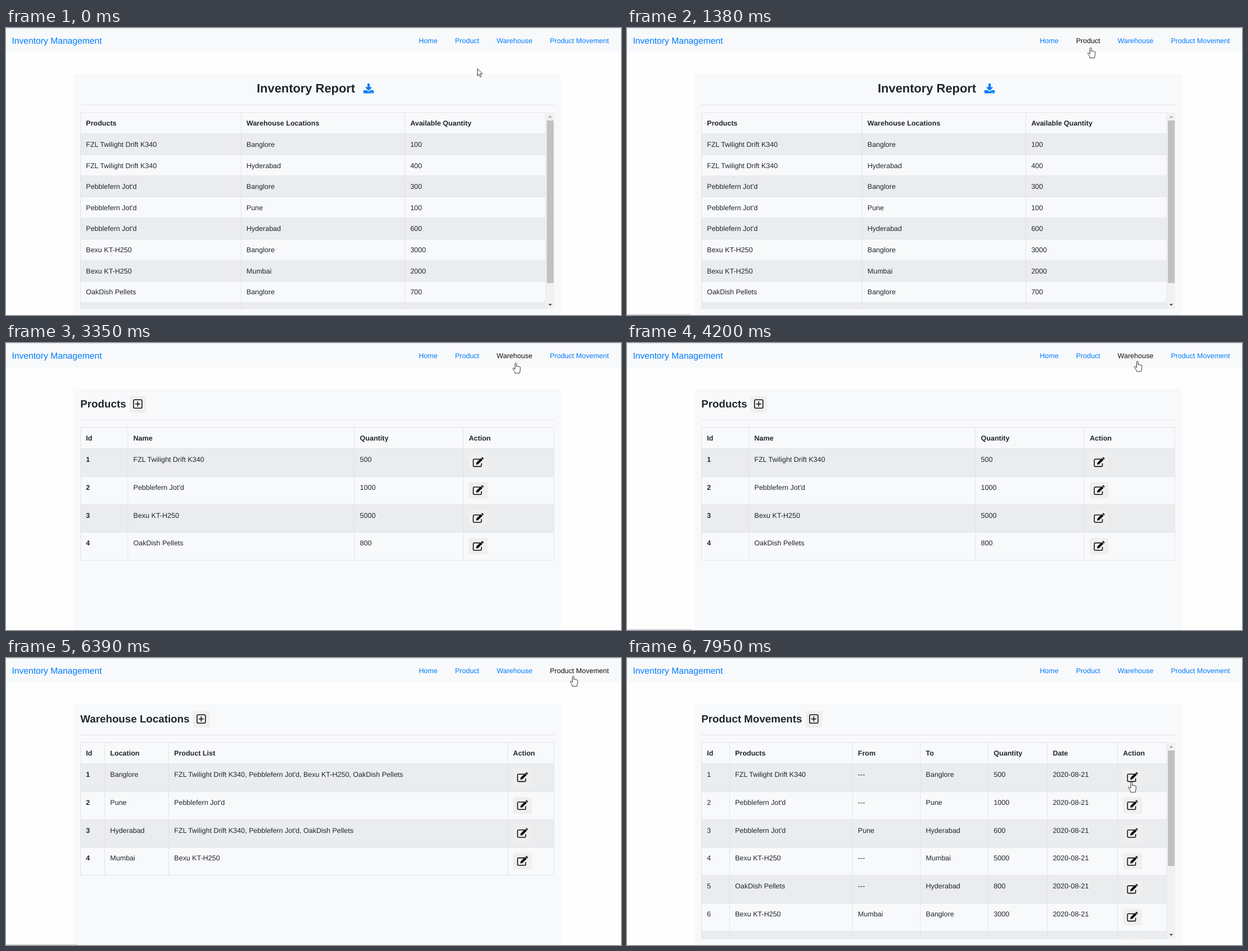
Recreate the animation shown at these times as an HTML page. Size 1094 by 512 pixels, loop 8 s.

```html
<!DOCTYPE html>
<html lang="en">
<head>
<meta charset="utf-8">
<title>Inventory Management</title>
<style>
  html, body { margin: 0; height: 100%; overflow: hidden; background: #fefefe; }
  svg { display: block; width: 100vw; height: 100vh; }
  text { font: 12.52px "Liberation Sans", Arial, sans-serif; fill: #212529; text-rendering: geometricPrecision; white-space: pre; }
  .bold { font-weight: 700; }
  .title { font-weight: 700; font-size: 18.75px; }
  .report { font-weight: 700; font-size: 21.9px; }
  .brand { font-size: 15.65px; }
  .brand, .link { fill: #007bff; }
  .link.on { fill: #111; }
  .line { stroke: #dee2e6; stroke-width: .9; }
  .button { fill: #efefef; }
  .icon { fill: none; stroke: #111; stroke-width: 1.6; stroke-linejoin: round; stroke-linecap: round; }
  .pointer { fill: #fff; stroke: #333; stroke-width: 1; stroke-linejoin: round; }
</style>
</head>
<body>
<svg id="stage" viewBox="0 0 1094 512" xmlns="http://www.w3.org/2000/svg"></svg>
<script>
const LOOP = 8000, STEP = 77;
const LEFT = 132.6, RIGHT = 974.6, TOP = 150.6, BODY = 188.5, BOTTOM = 501.5, SCROLLBAR = 14.6;
const PAD = 9.7, TEXT_SIZE = 12.52, TITLE_SIZE = 18.75;

const GLIDE = "FZL Twilight Drift K340", JOT = "Pebblefern Jot'd",
      BEXU = "Bexu KT-H250", OAK = "OakDish Pellets";

const ruler = document.createElement("canvas").getContext("2d");
function measure(s, size = TEXT_SIZE, weight = 400) {
  ruler.font = `${weight} 100px "Liberation Sans", Arial, sans-serif`;
  return ruler.measureText(s).width * size / 100;
}

const rect = (x, y, w, h, fill, extra = "") =>
  `<rect x="${x}" y="${y}" width="${w}" height="${h}" fill="${fill}" ${extra}/>`;
const text = (x, y, s, cls = "") => `<text x="${x}" y="${y}" class="${cls}">${s}</text>`;
const line = (x1, y1, x2, y2) => `<path class="line" d="M${x1} ${y1}L${x2} ${y2}"/>`;
const button = (x, y, w, h) => `<rect class="button" x="${x}" y="${y}" width="${w}" height="${h}" rx="3"/>`;

const editButton = (x, y) => button(x, y, 33.6, 29.8) +
  `<g transform="translate(${x + 16.6} ${y + 14.5})">
    <path class="icon" d="M2.8-5.4H-7a1.6 1.6 0 0 0-1.6 1.6V6.2a1.6 1.6 0 0 0 1.6 1.6H4.2a1.6 1.6 0 0 0 1.6-1.6V2.6"/>
    <path fill="#111" d="M-3.6 4.4l.4-3.4 8.1-8 3 3-8.1 8zM5.6-7.6l.9-.9q.8-.6 1.5 0l1.5 1.5q.6.8 0 1.5l-.9.9z"/>
  </g>`;

const heading = title => {
  const x = LEFT + 6 + measure(title, TITLE_SIZE, 700);
  return text(LEFT - .3, 114.6, title, "title") + button(x, 94.4, 29.4, 29.8) +
    `<path class="icon" d="M${x + 9} 101.2h11q2 0 2 2v11q0 2-2 2h-11q-2 0-2-2v-11q0-2 2-2zM${x + 14.5} 104.7v8M${x + 10.5} 108.7h8"/>`;
};

const downloadIcon = `<g transform="translate(635.8 99)" fill="#007bff">
  <path d="M7.2.8q0-.8.8-.8h2.4q.8 0 .8.8v5.8h3.1q1.1 0 .4.9l-4.9 5q-.6.5-1.2 0l-4.9-5q-.7-.9.4-.9h3.1z"/>
  <path d="M.9 11.9h4.9l1.9 1.8q1.5 1.2 3 0l1.9-1.8h4.9q.9 0 .9.9v3.8q0 .9-.9.9H.9q-.9 0-.9-.9v-3.8q0-.9.9-.9z"/>
  <path fill="#f8f9fa" d="M12.5 15.2h1.3v1.2h-1.3zM15 15.2h1.3v1.2H15z"/>
</g>`;

const scrollbar = thumb =>
  rect(961, 151, 14.3, 350.5, "#f1f1f1") + rect(962, 165, 12.2, thumb, "#c1c1c1") +
  `<path fill="#a3a3a3" d="M964.6 160h6.8l-3.4-3.6z"/><path fill="#505050" d="M964.6 492.2h6.8l-3.4 3.6z"/>`;

// Spare width is shared in proportion to each column's widest cell.
function columnEdges(head, rows, right) {
  const widths = head.map((title, i) => 2 * PAD +
    Math.max(measure(title, TEXT_SIZE, 700), ...rows.map(row => measure(row[i] ?? ""))));
  const scale = (right - LEFT) / widths.reduce((a, b) => a + b);
  const edges = [LEFT];
  for (const w of widths) edges.push(edges.at(-1) + w * scale);
  return edges;
}

function table({ head, rows, rowHeight, boldId, thumb }) {
  head = head.split("|");
  rows = rows.map(row => row.split("|"));
  const right = thumb ? RIGHT - SCROLLBAR : RIGHT;
  const edges = columnEdges(head, rows, right);
  const end = BODY + rows.length * rowHeight;
  let out = "";
  rows.forEach((row, i) => {
    const y = BODY + i * rowHeight;
    if (i % 2 === 0) out += rect(LEFT, y, right - LEFT, rowHeight, "#ebecee");
    row.forEach((cell, c) => out += text(edges[c] + PAD, y + 23.4, cell, boldId && c === 0 ? "bold" : ""));
    if (row.length < head.length) out += editButton(edges.at(-2) + PAD, y + 9.6);
    out += line(LEFT, y + rowHeight, right, y + rowHeight);
  });
  head.forEach((title, c) => out += text(edges[c] + PAD, 173.7, title, "bold"));
  out += line(LEFT, TOP, right, TOP) + line(LEFT, BODY, right, BODY);
  out += edges.map(x => line(x, TOP, x, end)).join("");
  return `<g clip-path="url(#view)">${out}</g>` + (thumb ? scrollbar(thumb) : "");
}

const pages = [
  {
    start: 0,
    content: text(446, 115.2, "Inventory Report", "report") + downloadIcon + table({
      head: "Products|Warehouse Locations|Available Quantity", rowHeight: 37.6, thumb: 290,
      rows: [`${GLIDE}|Banglore|100`, `${GLIDE}|Hyderabad|400`, `${JOT}|Banglore|300`, `${JOT}|Pune|100`,
        `${JOT}|Hyderabad|600`, `${BEXU}|Banglore|3000`, `${BEXU}|Mumbai|2000`, `${OAK}|Banglore|700`, `${OAK}|Hyderabad|100`]
    })
  },
  {
    start: 1620,
    content: heading("Products") + table({
      head: "Id|Name|Quantity|Action", rowHeight: 49.8, boldId: true,
      rows: [`1|${GLIDE}|500`, `2|${JOT}|1000`, `3|${BEXU}|5000`, `4|${OAK}|800`]
    })
  },
  {
    start: 4460,
    content: heading("Warehouse Locations") + table({
      head: "Id|Location|Product List|Action", rowHeight: 49.8, boldId: true,
      rows: [`1|Banglore|${GLIDE}, ${JOT}, ${BEXU}, ${OAK}`, `2|Pune|${JOT}`,
        `3|Hyderabad|${GLIDE}, ${JOT}, ${OAK}`, `4|Mumbai|${BEXU}`]
    })
  },
  {
    start: 6480,
    content: heading("Product Movements") + table({
      head: "Id|Products|From|To|Quantity|Date|Action", rowHeight: 49.8, thumb: 206,
      rows: [`${GLIDE}|---|Banglore|500`, `${JOT}|---|Pune|1000`, `${JOT}|Pune|Hyderabad|600`, `${BEXU}|---|Mumbai|5000`,
        `${OAK}|---|Hyderabad|800`, `${BEXU}|Mumbai|Banglore|3000`, `${OAK}|Hyderabad|Banglore|700`,
        `${JOT}|Pune|Banglore|300`, `${GLIDE}|Banglore|Hyderabad|400`, `${JOT}|---|Pune|100`]
        .map((row, i) => `${i + 1}|${row}|2020-08-21`)
    })
  }
];

// Navigation is laid out from the right edge.
let navRight = 1072.5;
const links = ["Product Movement", "Warehouse", "Product", "Home"].map(label => {
  const width = measure(label), x = navRight - width;
  navRight = x - 31;
  return { label, x, width };
});

// Each glide runs in even steps to (x, y); bow bends its path downwards.
const glides = [
  { start: 80, steps: 7, x: 825, y: 35, bow: 0 },
  { start: 2330, steps: 5, x: 906, y: 38.5, bow: 0 },
  { start: 3350, steps: 2, x: 908, y: 32.5, bow: 0 },
  { start: 4900, steps: 5, x: 1008, y: 38, bow: 8 },
  { start: 5315, steps: 3, x: 1009, y: 32, bow: 0 },
  { start: 6940, steps: 8, x: 903, y: 82, bow: -5 },
  { start: 7873, steps: 2, x: 897.5, y: 221, bow: 0 }
];
const visits = [
  { click: 1150, status: 690, width: 114 },
  { click: 3970, status: 3660, width: 115 },
  { click: 6160, status: 5690, width: 127 }
];
const CLICK_LENGTH = 230, STATUS_LINGER = 700;

function pointerAt(t) {
  let x = 838, y = 72, movedAt = 0;
  for (const g of glides) {
    if (t < g.start) break;
    const p = Math.min(1, (Math.floor((t - g.start) / STEP) + 1) / g.steps);
    x += (g.x - x) * p;
    y += (g.y - y) * p + g.bow * Math.sin(Math.PI * p);
    movedAt = g.start;
  }
  return { x, y, movedAt };
}

const stage = document.getElementById("stage");
stage.innerHTML =
  `<clipPath id="view"><rect x="132" y="150" width="843" height="${BOTTOM - 150}"/></clipPath>` +
  rect(0, 0, 1094, 512, "#fefefe") + rect(0, 0, 1094, 43.8, "#f8f9fb") + rect(0, 0, 1094, 1, "#dfe1e4") +
  text(10.5, 27.6, "Inventory Management", "brand") +
  links.map(l => text(l.x, 26.5, l.label, "link")).join("") +
  rect(120.8, 82, 866.4, 440, "#f8f9fb", 'rx="3"') + rect(132.3, 136.8, 843.4, .9, "#dfe0e2") +
  pages.map(p => `<g class="page">${p.content}</g>`).join("") +
  `<rect id="status" y="510.6" height="4" rx="1.5" fill="#d2d4d6"/>
  <g id="cursor">
    <circle id="click" r="10.3" fill="#ff0" fill-opacity=".47"/>
    <path id="arrow" class="pointer" d="M.5.5V13.2l2.9-2.7 2.1 5 2.1-.9-2.1-4.8h4.1z"/>
    <path id="hand" class="pointer" d="M-1.5 1.4C-1.5-.2 1.2-.2 1.2 1.4V6.6c0-1.3 2.4-1.2 2.4.3.2-1.1 2.3-.9 2.3.5.3-1 2-.7 2 .8V12c0 2-1.1 3-1.1 5v1.4H-1.6V17C-1.8 15.2-4.4 13.2-5.2 10.6c-.5-1.5 1-2.2 2-1L-1.5 11.4z"/>
  </g>`;

const $ = id => document.getElementById(id);
const pageNodes = [...stage.querySelectorAll(".page")];
const linkNodes = [...stage.querySelectorAll(".link")];
const show = (node, on) => node.setAttribute("visibility", on ? "visible" : "hidden");
const during = (t, start, length) => t >= start && t < start + length;

function draw(t) {
  const page = pages.findLast(p => t >= p.start);
  const { x, y, movedAt } = pointerAt(t);
  const over = y < 37.7 ? links.findIndex(l => x > l.x - 6 && x < l.x + l.width + 6) : -1;
  const hand = over >= 0 || y > 200;

  pageNodes.forEach((node, i) => show(node, pages[i] === page));
  // A freshly loaded page shows no hover until the pointer moves again.
  const hovered = movedAt >= page.start ? over : -1;
  linkNodes.forEach((node, i) => node.classList.toggle("on", i === hovered));

  $("cursor").setAttribute("transform", `translate(${x} ${y})`);
  show($("hand"), hand);
  show($("arrow"), !hand);
  show($("click"), visits.some(v => during(t, v.click, CLICK_LENGTH)));

  const visit = visits.find(v => during(t, v.status, v.click + STATUS_LINGER - v.status));
  $("status").setAttribute("width", visit ? visit.width : 0);
}

const begin = performance.now();
function tick() {
  draw((performance.now() - begin) % LOOP);
  requestAnimationFrame(tick);
}
tick();
</script>
</body>
</html>
```
